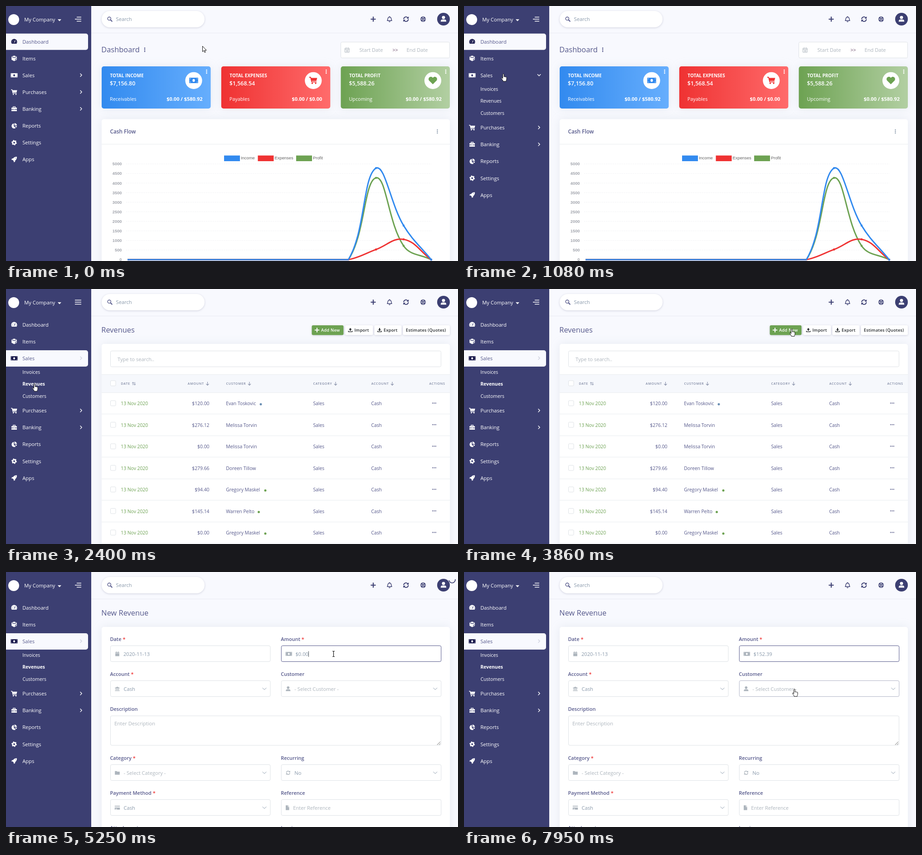
An HTML page that plays this animation: 997x562 px, repeating every 8000 ms.

```html
<!DOCTYPE html>
<html lang="en">
<head>
<meta charset="utf-8">
<title>Accounting dashboard</title>
<style>
html, body { margin: 0; width: 100%; height: 100%; overflow: hidden; background: #f8f9fe; }
svg { display: block; width: 997px; height: 562px; font-family: "Open Sans", sans-serif; }
.chart { font-family: "Liberation Sans", Arial, sans-serif; }
.i { fill: currentColor; stroke-linecap: round; stroke-linejoin: round; }
.s { fill: none; stroke: currentColor; stroke-width: 1.4; }
.c { fill: none; stroke: var(--cut); stroke-width: 1.2; }
.item { color: #fff; --cut: #3c3f72; }
.item .pill { display: none; }
.item.on { color: #55588b; --cut: #f8f9fe; }
.item.on .pill { display: inline; }
.item.on .i { color: #1b1b4d; }
.item.on .chev { color: #cfd2de; }
.card { filter: drop-shadow(0 0 10px #8898aa26); }
.lift { filter: drop-shadow(0 1px 2px #32325d33); }
</style>
</head>
<body>
<svg id="stage" viewBox="0 0 997 562"></svg>
<script>
const NAVY = '#3c3f72', INK = '#55588b', GREY = '#adb5bd', MUTED = '#8898aa', LINE = '#dee2e6',
  BLUE = '#328aef', RED = '#ef3232', GREEN = '#6da252';

const text = (x, y, size, str, fill = INK, weight = 400, attrs = '') =>
  `<text x="${x}" y="${y}" font-size="${size}" fill="${fill}" font-weight="${weight}" ${attrs}>${str}</text>`;
const box = (x, y, w, h, r, fill, attrs = '') =>
  `<rect x="${x}" y="${y}" width="${w}" height="${h}" rx="${r}" fill="${fill}" ${attrs}/>`;
const input = (x, y, w, h, attrs = '') => box(x + .5, y + .5, w - 1, h - 1, 3, '#fff', `stroke="${LINE}" ${attrs}`);
const hline = (x, y, w, color = '#e9ecef') => box(x, y, w, 1, 0, color);
const dot = (x, y, r, fill) => `<circle cx="${x}" cy="${y}" r="${r}" fill="${fill}"/>`;
const dots = (x, y, dx, dy, r, fill) => [-1, 0, 1].map(k => dot(x + k * dx, y + k * dy, r, fill)).join('');
const solid = d => `<path d="${d}"/>`;
const line = (d, cls = 's', attrs = '') => `<path class="${cls}" d="${d}" ${attrs}/>`;
const disc = (x, y, r, cls = '') => `<circle class="${cls}" cx="${x}" cy="${y}" r="${r}"/>`;

const icons = {
  gauge: solid('M-5.2 4.6A6.5 6.5 0 1 1 5.2 4.6Z') + line('M0 2L2.2-2.6M-4 1h.1M4 1h.1M-2.6-2.5h.1', 'c'),
  cube: solid('M0-6.2L5.8-3.8V3L0 6L-5.8 3V-3.8Z') + line('M-4-3.2L0-1.6L4-3.2M2.2 3L4 2V0', 'c'),
  money: solid('M-7.5-4.6H7.5V4.6H-7.5Z') + `<ellipse rx="2" ry="2.5" fill="var(--cut)"/>` +
    line('M-5.8-2.9h.1M5.8-2.9h.1M-5.8 2.9h.1M5.8 2.9h.1', 'c'),
  cart: solid('M-4.4-4.3H6.6L5.2 1H-3Z') + line('M-6.4-5.4H-4.6L-2.6 2.6H5') + disc(-1.8, 4.9, 1.3) + disc(4, 4.9, 1.3),
  bag: solid('M-6-3H6V4.8H-6Z') + line('M-2.4-3.4V-5H2.4V-3.4') + line('M-6 1H-1M1 1H6', 'c'),
  pie: solid('M-.8-5.4V.6L3.4 4.8A5.7 5.7 0 1 1-.8-5.4Z') + solid('M.7-6A5.6 5.6 0 0 1 6.2-.8H.7Z') + solid('M1.6.6H6.2A5.6 5.6 0 0 1 4.4 3.8Z'),
  cog: '<circle class="s" r="3.3" style="stroke-width:2.8"/><circle class="s" r="4.9" pathLength="12" stroke-dasharray="1" style="stroke-width:2;stroke-linecap:butt"/>',
  rocket: solid('M6-6C2-6.4-.6-4.6-2.4-2.2H-4.6L-6.2.8L-3.4 1L-1 3.4L-.8 6.2L2.2 4.6V2.4C4.6.6 6.4-2 6-6Z') + line('M3-3h.1', 'c'),
  plus: line('M-4.7 0H4.7M0-4.7V4.7', 's', 'style="stroke-width:2.2"'),
  bell: line('M-5 3.2C-3-.2-4.8-4.6 0-4.8C4.8-4.6 3-.2 5 3.2ZM0-6V-5M-1.2 5.2Q0 6.4 1.2 5.2'),
  sync: line('M-5-.8A5 5 0 0 1 4-3M5 .8A5 5 0 0 1-4 3', 's', 'style="stroke-width:1.9"') +
    solid('M6-6V-1.2H1.2ZM-6 6V1.2H-1.2Z'),
  ring: disc(0, 0, 5.2, 's') + disc(0, 0, 2.3, 's') + line('M-3.5-3.5L-1.7-1.7M3.5 3.5L1.7 1.7M-3.5 3.5L-1.7 1.7M3.5-3.5L1.7-1.7', 's', 'style="stroke-width:2"'),
  user: disc(0, -2.8, 3) + solid('M-5.3 5.2V4Q-5 1-2 1H2Q5 1 5.3 4V5.2Z'),
  search: disc(-1.2, -1.2, 3.6, 's') + line('M1.8 1.8L4.8 4.8', 's', 'style="stroke-width:2"'),
  heart: solid('M0 6.6L-6.6 0C-9-4-4-8.6 0-4.4C4-8.6 9-4 6.6 0Z'),
  calendar: line('M-4.5-3.8H4.5V5H-4.5ZM-4.5-1.2H4.5M-2.2-5.2V-4M2.2-5.2V-4M-2 1H2M-2 3H2', 's', 'style="stroke-width:1"'),
  date: solid('M-4.6-4H4.6V-2H-4.6ZM-4.6-1.2H4.6V5.2H-4.6ZM-3-5.6h1.6v2H-3ZM1.4-5.6H3v2H1.4Z'),
  bank: solid('M0-5L5.4-2.4V-1.4H-5.4V-2.4ZM-5.4 3.6H5.4V5H-5.4ZM-4-.8h1.8V3H-4ZM-.9-.8H.9V3H-.9ZM2.2-.8H4V3H2.2Z'),
  folder: solid('M-5.6-4H-1.4L0-2.6H5.6V4.4H-5.6Z'),
  credit: solid('M-6-4.4H6V-2.6H-6ZM-6-.6H6V4.6H-6Z') + line('M-4 3H-1', 'c'),
  file: solid('M-4-5.4H1V-1.6H4V5.4H-4ZM1.8-5.4L4-2.6H1.8Z'),
  up: solid('M0-5L3.6-1.2H1.2V2H-1.2V-1.2H-3.6Z') + line('M-4.6 2.4V4.2H4.6V2.4'),
  down: solid('M0 2.4L3.6-1.2H1.2V-4.8H-1.2V-1.2H-3.6Z') + line('M-4.6 2.4V4.2H4.6V2.4'),
  sort: line('M0-3.4V3.4M-2.8 .8L0 3.6L2.8 .8', 's', 'style="stroke-width:1.1"'),
  sort2: line('M-1.8 3V-3M-3.4-1.4L-1.8-3.2L-.2-1.4M2-3V3M.4 1.4L2 3.2L3.6 1.4', 's', 'style="stroke-width:1"'),
  open: line('M-4-2L0 2L4-2', 's', 'style="stroke-width:1"')
};
const icon = (name, x, y, color, scale = 1, cut = '#fff') =>
  `<g class="i" transform="translate(${x} ${y}) scale(${scale})" ${color ? `style="color:${color};--cut:${cut}"` : ''}>${icons[name]}</g>`;

// Dashboard
const statCard = (x, grad, color, name, title, total, label, due) =>
  box(x, 133, 240.5, 93, 5, `url(#${grad})`, 'class="card"') + text(x + 18.5, 157, 10, title, '#fff', 700) +
  text(x + 18, 174.5, 12.4, total, '#fff', 600) + text(x + 18, 209, 10.8, label, '#fff') +
  text(x + 222.5, 209, 11, due, '#fff', 700, 'text-anchor="end"') + dot(x + 203, 164.3, 18.6, '#fff') +
  icon(name, x + 203, 164, color, 1.3) + dots(x + 231.5, 144.7, 0, 3.4, 1.3, '#fff');

function spline(values, color) {
  const pts = values.map((v, i) => [268 + i * 60.9, 559 - v * .0422]);
  const clamp = ([x, y]) => [Math.min(938, x), Math.max(348, Math.min(559, y))].map(n => n.toFixed(1));
  const ctrl = pts.map(([x, y], i) => {
    const [px, py] = pts[i - 1] || pts[i], [nx, ny] = pts[i + 1] || pts[i];
    const a = Math.hypot(x - px, y - py), b = Math.hypot(nx - x, ny - y), k = .4 / (a + b);
    return [clamp([x - k * a * (nx - px), y - k * a * (ny - py)]), clamp([x + k * b * (nx - px), y + k * b * (ny - py)])];
  });
  const d = pts.map((p, i) => i ? `C${ctrl[i - 1][1]} ${ctrl[i][0]} ${p}` : 'M' + p).join('');
  return `<path d="${d}" fill="none" stroke="${color}" stroke-width="3"/>` +
    pts.slice(9).map(p => dot(p[0], p[1], 2.3, color)).join('');
}
const series = (a, b, color) => spline([...Array(9).fill(0), a, b, 0], color);
const legend = (x, tx, label, color) => box(x, 329.5, 35, 12.5, 0, color) + text(tx, 338.3, 9.4, label, '#666');
const ticks = Array.from({ length: 11 }, (_, k) => {
  const y = 348 + k * 21.1;
  return text(255.5, y + 3.3, 9.3, 5000 - k * 500, '#a3a6ae', 700, 'text-anchor="end"') +
    `<path d="M265 ${y}H938" stroke="#eeeff2" stroke-dasharray="2 2"/>`;
}).join('');

const dashboard = text(210.3, 102, 16.4, 'Dashboard', INK, 500) + dots(306, 96.5, 0, 3.6, 1.3, INK) +
  input(738, 79, 241, 36) + icon('calendar', 752.5, 97, GREY) + text(779.5, 101, 11.1, 'Start Date', GREY) +
  text(852.5, 101, 10.5, '&gt;&gt;', '#6b4a6a') + text(883.5, 101, 11.1, 'End Date', GREY) +
  statCard(211, 'blue', BLUE, 'money', 'TOTAL INCOME', '$7,156.80', 'Receivables', '$0.00 / $580.92') +
  statCard(474.8, 'red', RED, 'cart', 'TOTAL EXPENSES', '$1,568.54', 'Payables', '$0.00 / $0.00') +
  statCard(738.5, 'green', GREEN, 'heart', 'TOTAL PROFIT', '$5,588.26', 'Upcoming', '$0.00 / $580.92') +
  box(211, 249.5, 768, 340, 5, '#fff', 'class="card"') + text(229.5, 281, 11.8, 'Cash Flow', INK, 600) +
  hline(211, 304, 768) + dots(951.5, 276.5, 0, 3.5, 1.2, MUTED) +
  `<g class="chart">${legend(481, 518, 'Income', BLUE)}${legend(555.5, 592.5, 'Expenses', RED)}${legend(640, 677, 'Profit', GREEN)}${ticks}</g>` +
  series(4270, 720, GREEN) + series(530, 1060, RED) + series(4780, 1780, BLUE);

// Revenues list
const button = (x, w, label, name, fill = '#fff', color = '#212529') =>
  box(x, 80, w, 21.5, 3, fill, 'class="lift"') + (name ? icon(name, x + 11.5, 90.5, color, .92) : '') +
  text(x + (name ? 20.5 : 6.5), 94, 9.2, label, color, 600, 'letter-spacing=".27"');
const check = y => box(230.5, y - 6, 11.5, 11.5, 2, '#fff', `stroke="${LINE}"`);
const heading = (x, label, arrow, name = 'sort') =>
  text(x, 211.3, 7.2, label, '#7f88a3', 600, 'letter-spacing=".65"') + (arrow ? icon(name, arrow, 208.5, '#7f88a3') : '');
const rows = [
  ['$120.00', 'Evan Toskovic', 562, '#6b8fb3'], ['$276.12', 'Melissa Torvin'], ['$0.00', 'Melissa Torvin'],
  ['$279.66', 'Doreen Tillow'], ['$94.40', 'Gregory Maskel', 572, GREEN],
  ['$145.14', 'Warren Pelto', 557.5, GREEN], ['$0.00', 'Gregory Maskel', 572, GREEN]
].map(([amount, name, mark, color], i) => {
  const y = 252 + i * 47.5, b = y + 4, cell = (x, s, fill, attrs) => text(x, b, 10.35, s, fill, 400, attrs);
  return check(y) + cell(253.3, '13 Nov 2020', GREEN) + cell(448.5, amount, INK, 'text-anchor="end"') + cell(485.2, name) +
    (mark ? dot(mark, y + 2, 2.5, color) : '') + cell(677.4, 'Sales') + cell(805.4, 'Cash') +
    dots(944.5, y - .5, 3.4, 0, 1.3, '#7f82a5') + hline(211, Math.round(y + 23.3), 768);
}).join('');

const revenues = text(210.3, 96, 16.4, 'Revenues', INK, 500) +
  button(674.5, 70, 'Add New', 'plus', GREEN, '#fff') + button(748, 61.5, 'Import', 'up') +
  button(812.5, 60, 'Export', 'down') + button(875.5, 103.5, 'Estimates (Quotes)') +
  box(211, 121, 768, 460, 5, '#fff', 'class="card"') + input(230, 136, 730, 36, 'id="finder"') +
  text(246, 159, 11.1, 'Type to search..', GREY) +
  box(211, 188, 768, 40, 0, '#f6f8fc') + hline(211, 188, 768) + hline(211, 228, 768) + check(208) +
  heading(253.5, 'DATE', 282, 'sort2') + heading(400.8, 'AMOUNT', 444.5) + heading(485.5, 'CUSTOMER', 537) +
  heading(677.5, 'CATEGORY', 727) + heading(805.8, 'ACCOUNT', 852) + heading(933.5, 'ACTIONS') + rows;

// New revenue form
const label = (x, y, str, required) =>
  text(x - .6, y, 11, str + (required ? ' <tspan fill="#ef3232">*</tspan>' : ''), INK, 600);
const field = (x, y, name, required, glyph, dx, value, { select, fill = GREY, id = '' } = {}) =>
  label(x, y - 10, name, required) + input(x, y, 353.5, 36, id && `id="${id}"`) +
  icon(glyph, x + (dx < 28 ? 14 : dx > 31 ? 17 : 15.5), y + 18.5, GREY, .95) +
  text(x + dx - .5, y + 23, 11.15, value, fill, 400, id && `id="${id}Text"`) +
  (select ? icon('open', x + 340, y + 18.5, MUTED) : '');
const pick = { select: true }, chosen = { select: true, fill: MUTED };
const form = text(210.3, 96, 16.4, 'New Revenue', INK, 500) + box(211, 121, 768, 460, 5, '#fff', 'class="card"') +
  field(230, 162, 'Date', true, 'date', 29.5, '2020-11-13', { fill: MUTED }) +
  field(606.8, 162, 'Amount', true, 'money', 32.2, '$0.00', { fill: MUTED, id: 'amount' }) +
  field(230, 239, 'Account', true, 'bank', 30, 'Cash', chosen) +
  field(606.8, 239, 'Customer', false, 'user', 30, '- Select Customer -', { select: true, id: 'customer' }) +
  label(230, 306, 'Description') + input(230, 316.5, 730, 66) + text(239, 337.5, 11.15, 'Enter Description', GREY) +
  '<path d="M951 381L958 374M955 381L958 378" stroke="#666" fill="none"/>' +
  field(230, 424, 'Category', true, 'folder', 30, '- Select Category -', pick) +
  field(606.8, 424, 'Recurring', false, 'sync', 30, 'No', chosen).replace('scale(0.95)', 'scale(.75)') +
  field(230, 501, 'Payment Method', true, 'credit', 30, 'Cash', chosen) +
  field(606.8, 501, 'Reference', false, 'file', 27, 'Enter Reference') +
  label(230, 568, 'Attachment') + label(606.8, 568, 'Invoice') + box(0, 174.5, 1, 12.5, 0, '#495057', 'id="caret"');

// Frame: header and sidebar
const header = hline(188, 59, 809, '#e8eaf3') + box(211, 11, 227, 36, 18, '#fff', 'class="lift"') +
  icon('search', 229, 29, INK) + text(242.5, 33, 11.2, 'Search', MUTED) +
  icon('plus', 810, 29, NAVY) + icon('bell', 846, 29, NAVY) + icon('sync', 882.3, 29, NAVY) +
  icon('ring', 920, 29, NAVY) + dot(965, 29, 14, NAVY) + icon('user', 965, 28.5, '#fff', 1.15) +
  box(0, 0, 997, 2, 0, NAVY, 'id="bar"') +
  `<path id="spinner" d="M-7 0A7 7 0 0 0 7 0" fill="none" stroke="${NAVY}" stroke-width="1.7"/>`;

const menu = [['Dashboard', 'gauge'], ['Items', 'cube'], ['Sales', 'money'], ['Purchases', 'cart'],
  ['Banking', 'bag'], ['Reports', 'pie'], ['Settings', 'cog'], ['Apps', 'rocket']].map(([name, glyph], i) => {
  const y = 78.4 + i * 37.13;
  return `<g class="item" id="menu${i}">${box(-6, y - 17.6, 187, 36, 5, '#f8f9fe', 'class="pill"')}${icon(glyph, 18, y)}` +
    text(36.2, y + 4.1, 11.2, name, 'currentColor') +
    (i > 1 && i < 5 ? `<g class="i chev" transform="translate(165.6 ${y - .3})"><path id="chev${i}" class="s" d="M-1.6-3.2L1.6 0L-1.6 3.2"/></g>` : '') + '</g>';
});
const sidebar = box(0, 0, 188, 562, 0, NAVY) + dot(17, 30, 12, '#fff') +
  text(40.2, 34.2, 11.15, 'My Company', '#fff') + '<path d="M114 29.3H122L118 33.5Z" fill="#fff"/>' +
  '<path id="burger" stroke="#fff" stroke-width="1.4"/>' + menu.slice(0, 3).join('') +
  `<g clip-path="url(#fold)">${text(36.2, 187, 10.4, 'Invoices', '#fff')}${text(36.2, 213, 10.4, 'Revenues', '#fff', 400, 'id="current"')}${text(36.4, 239.6, 10.4, 'Customers', '#fff')}</g>` +
  `<g id="lower">${menu.slice(3).join('')}</g>`;

const gradient = (id, a, b) => `<linearGradient id="${id}"><stop stop-color="${a}"/><stop offset="1" stop-color="${b}"/></linearGradient>`;
const pointer = (id, d) => `<path id="${id}" d="${d}" fill="#fff" stroke="#111" stroke-linejoin="round"/>`;

document.getElementById('stage').innerHTML =
  `<defs>${gradient('blue', BLUE, '#66aefd')}${gradient('red', RED, '#ff6b6b')}${gradient('green', GREEN, '#b2cfa2')}` +
  '<clipPath id="fold"><rect id="foldRect" y="171" width="188" height="0"/></clipPath></defs>' +
  box(0, 0, 997, 562, 0, '#f8f9fe') +
  [dashboard, revenues, form].map((p, i) => `<g id="page${i}">${p}</g>`).join('') + header + sidebar + '<g id="cursor">' +
  pointer('arrow', 'M0 0V12.2L2.9 9.6L4.8 14L6.6 13.2L4.8 9H8.6Z') +
  pointer('hand', 'M-1.3 10.3V1.2a1.3 1.3 0 0 1 2.6 0V6.5a1.1 1.1 0 0 1 2.1.2a1.1 1.1 0 0 1 2 .5a1 1 0 0 1 1.8.7V11.3c0 1.6-1 2.6-1.2 5H-.5C-.8 13.8-3.3 11.8-4.1 9.9c-.6-1.4.8-2 1.7-1z') +
  '<path id="beam" d="M-2.5-6H-.7L0-5.4L.7-6H2.5M0-5.4V5.4M-2.5 6H-.7L0 5.4L.7 6H2.5" fill="none" stroke="#111" stroke-width="1.2"/></g>';

const $ = id => document.getElementById(id);
const set = (id, name, value) => $(id).setAttribute(name, value);
const show = (id, on) => $(id).style.display = on ? '' : 'none';
const ease = p => p * p * (3 - 2 * p);
const clamp01 = v => Math.max(0, Math.min(1, v));
// Progress in n visible steps, the first at a and the last at b
const step = (t, a, b, n) => t < a ? 0 : Math.min(1, (Math.floor((t - a) / (b - a) * (n - 1) + 1e-6) + 1) / n);

const moves = [[70, 530, 7, 86.8, 149.7], [1390, 1850, 7, 55.5, 203], [1920, 2080, 3, 62.8, 209],
  [2780, 3550, 11, 722.8, 88], [4480, 4860, 6, 722.5, 180.5], [7640, 7950, 5, 728.8, 258]];
const typed = [[5330, '$0.01'], [5710, '$0.15'], [6090, '$1.52'], [6870, '$15.23'], [7260, '$152.39']];

function render(t) {
  const page = t < 2400 ? 0 : t < 3940 ? 1 : 2;
  for (let i = 0; i < 3; i++) show('page' + i, i === page);

  const unfold = ease(step(t, 700, 1080, 6));
  set('foldRect', 'height', unfold * 79);
  set('lower', 'transform', `translate(0 ${unfold * 78.3})`);
  set('chev2', 'transform', `rotate(${page ? 0 : unfold * 90})`);
  set('menu0', 'class', page ? 'item' : 'item on');
  set('menu2', 'class', page ? 'item on' : 'item');
  set('current', 'font-weight', page ? 700 : 400);
  const indent = 152 + 4 * (page ? clamp01((t - (page === 1 ? 2400 : 3940)) / 150) : 1);
  set('burger', 'd', `M${indent} 24.5H166M152 29H166M${indent} 33.5H166`);

  let x = 433.5, y = 88.5;
  for (const [a, b, n, tx, ty] of moves) {
    const p = ease(step(t, a, b, n));
    x += (tx - x) * p;
    y += (ty - y) * p;
  }
  const over = (x0, y0, x1, y1) => x >= x0 && x <= x1 && y >= y0 && y <= y1;
  const onFinder = page === 1 && over(230, 136, 960, 172), onAmount = page === 2 && over(607, 162, 960, 198),
    onCustomer = page === 2 && over(607, 239, 960, 275);
  const beam = onFinder || onAmount;
  const hand = x < 188 || onCustomer || page === 1 && over(675, 80, 744, 101);
  show('beam', beam);
  show('hand', hand);
  show('arrow', !beam && !hand);
  set('cursor', 'transform', `translate(${x} ${y})`);

  const focused = t >= 5100, hover = on => on ? '#b0b3c6' : LINE;
  set('finder', 'stroke', hover(onFinder));
  set('customer', 'stroke', hover(onCustomer));
  set('amount', 'stroke', focused ? INK : hover(onAmount));
  $('amountText').textContent = typed.reduce((s, [at, v]) => t >= at ? v : s, '$0.00');
  show('caret', focused && t < 7640);
  if (page === 2) set('caret', 'x', 638.5 + $('amountText').getComputedTextLength());

  const loading = t >= 5250 && t < 6320, fade = t < 6170 ? 1 : 1 - clamp01((t - 6170) / 150);
  const load = t < 6170 ? .08 + .7 * step(t, 5330, 6090, 11) : 1;
  show('bar', loading);
  show('spinner', loading);
  set('bar', 'width', 997 * load);
  set('bar', 'opacity', fade);
  set('spinner', 'opacity', fade);
  set('spinner', 'transform', `translate(984 17) rotate(${Math.floor((t - 5250) / 76) * 68.4 - 10})`);
}

const start = performance.now();
(function tick() {
  render((performance.now() - start) % 8000);
  requestAnimationFrame(tick);
})();
</script>
</body>
</html>
```
